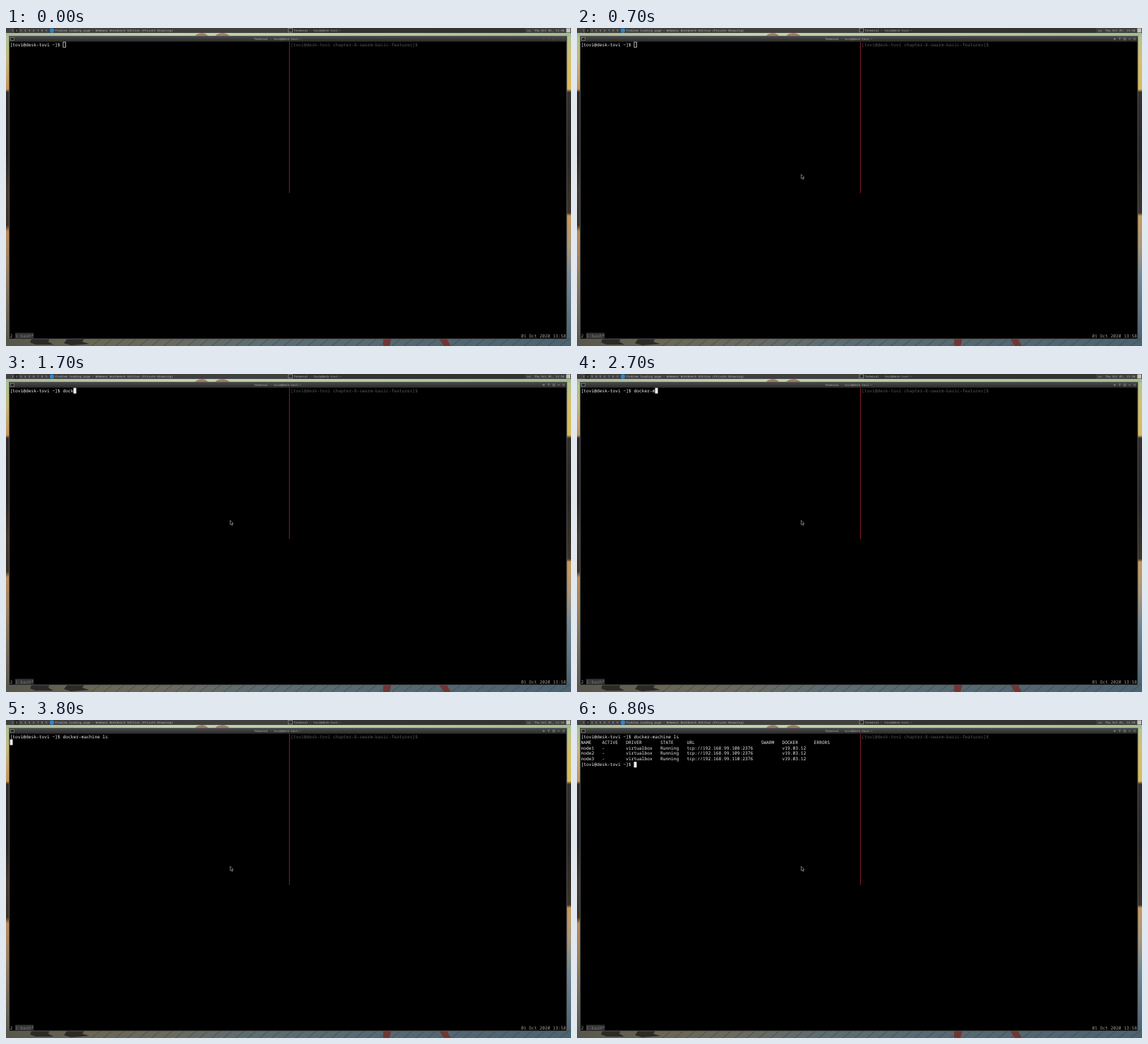
Recreate the animation shown at these times as an HTML page. Size 800x450 px, loop 8 s.

```html
<!DOCTYPE html>
<html lang="en">
<head>
<meta charset="utf-8">
<title>Terminal</title>
<style>
  html, body { margin: 0; width: 100%; height: 100%; overflow: hidden; background: #000; }
  svg { display: block; width: 100vw; height: 100vh; }
  text {
    font-family: "Noto Sans Mono", "DejaVu Sans Mono", monospace;
    white-space: pre;
    text-rendering: geometricPrecision;
  }
  .term text { font-size: 6.25px; fill: #f0f0f0; }
  .small text { font-size: 4.18px; fill: #b4b4b4; }
</style>
</head>
<body>
<svg id="stage" viewBox="0 0 800 450" preserveAspectRatio="none">
  <defs>
    <linearGradient id="sky">
      <stop offset="0" stop-color="#a9b795"/>
      <stop offset=".3" stop-color="#c3d2ae"/>
      <stop offset=".7" stop-color="#b4ca9e"/>
      <stop offset="1" stop-color="#a2bd90"/>
    </linearGradient>
    <linearGradient id="leftEdge" x1="0" y1="0" x2="0" y2="1">
      <stop offset="0" stop-color="#a9c193"/>
      <stop offset=".07" stop-color="#c3b67c"/>
      <stop offset=".17" stop-color="#c4935a"/>
      <stop offset=".18" stop-color="#2f2b28"/>
      <stop offset=".38" stop-color="#292725"/>
      <stop offset=".5" stop-color="#46382c"/>
      <stop offset=".61" stop-color="#3c3128"/>
      <stop offset=".63" stop-color="#b98a58"/>
      <stop offset=".74" stop-color="#9a8062"/>
      <stop offset=".87" stop-color="#74695a"/>
      <stop offset="1" stop-color="#56544a"/>
    </linearGradient>
    <linearGradient id="rightEdge" x1="0" y1="0" x2="0" y2="1">
      <stop offset="0" stop-color="#b4c490"/>
      <stop offset=".07" stop-color="#d3c06c"/>
      <stop offset=".17" stop-color="#d8ba5c"/>
      <stop offset=".18" stop-color="#33302e"/>
      <stop offset=".38" stop-color="#292725"/>
      <stop offset=".57" stop-color="#3c342c"/>
      <stop offset=".58" stop-color="#c79a5c"/>
      <stop offset=".68" stop-color="#a8987c"/>
      <stop offset=".78" stop-color="#748894"/>
      <stop offset="1" stop-color="#466072"/>
    </linearGradient>
    <linearGradient id="ground">
      <stop offset="0" stop-color="#57564b"/>
      <stop offset=".16" stop-color="#6b6754"/>
      <stop offset=".3" stop-color="#6a6a60"/>
      <stop offset=".45" stop-color="#5d6d72"/>
      <stop offset="1" stop-color="#4c6371"/>
    </linearGradient>
    <linearGradient id="titleBar" x1="0" y1="0" x2="0" y2="1">
      <stop offset="0" stop-color="#484848"/>
      <stop offset="1" stop-color="#2b2b2b"/>
    </linearGradient>
  </defs>

  <g id="wallpaper">
    <rect width="800" height="13" fill="url(#sky)"/>
    <path d="M266 13Q270 7 278 7Q285 8 287 13ZM295 13Q298 7 307 7Q315 8 318 13Z" fill="#a07e68"/>
    <rect y="12" width="6" height="438" fill="url(#leftEdge)"/>
    <rect x="793" y="12" width="7" height="438" fill="url(#rightEdge)"/>
    <rect y="438" width="800" height="12" fill="url(#ground)"/>
    <g id="planks" stroke="#3a474b" stroke-width=".8"/>
    <path d="M37 438H62L60 444L67 448H42L34 445ZM88 438H112L108 444L118 447L92 449L82 446Z" fill="#2b2a26"/>
    <path d="M534 438H546L543 450H534ZM612 438H623L630 450H620Z" fill="#713632"/>
  </g>

  <g class="small">
    <rect width="800" height="7" fill="#404040"/>
    <rect x="398" width="337" height="7" fill="#333"/>
    <rect x="12" width="6" height="7" fill="#262626"/>
    <g id="tags"></g>
    <circle cx="65" cy="3.6" r="3.1" fill="#2b86d0"/>
    <text x="69.5" y="5">Problem loading page - Webmoor Workbench Edition (Private Browsing)</text>
    <rect x="399.5" y=".8" width="6" height="5" fill="#222" stroke="#aaa" stroke-width=".7"/>
    <path d="M401 2.2l1.2 1l-1.2 1" fill="none" stroke="#ccc" stroke-width=".5"/>
    <text x="407.5" y="5">Terminal - tovi@desk-tovi:~</text>
    <text x="738" y="5">us</text>
    <text x="748" y="5">Thu Oct 01, 13:58</text>
    <rect x="793.3" y=".4" width="5.8" height="6" fill="#c4c4be"/>

    <rect x="4.5" y="11.5" width="789.5" height="428.5" fill="#000" stroke="#5c5c5c" stroke-width=".9"/>
    <rect x="5" y="12" width="788.5" height="7.4" fill="url(#titleBar)"/>
    <rect x="6.5" y="13.4" width="5" height="4.4" fill="#222" stroke="#999" stroke-width=".6"/>
    <text x="351" y="17.2">Terminal - tovi@desk-tovi:~</text>
    <path id="buttons" fill="none" stroke-width=".6"
      d="M759.5 15.5h3.6M761.3 13.7v3.6M766.8 14.2h3.2M768.4 14.2v3M774.3 14.2h2.6v2.6h-2.6zM780.8 15.6h3.4M788 14l3 3M791 14l-3 3"/>
  </g>

  <g class="term" id="term">
    <rect x="400.8" y="19.5" width="1.1" height="214" fill="#841a2c"/>
    <rect x="13" y="431.4" width="26.25" height="8" fill="#343434"/>
    <g id="fixed"></g>
    <g id="live"></g>
    <rect id="caret"/>
  </g>

  <path id="pointer" d="M317.4 207v6.2l1.4-1.2l1.1 2.3l1.1-.5l-1-2.2h1.9z" fill="#000" stroke="#ccc" stroke-width=".55"/>
</svg>
<script>
const LOOP = 8000, CELL = 3.75, ROW = 7.92, LEFT = 5.5, TOP = 19.6;
const NS = "http://www.w3.org/2000/svg";
const $ = id => document.getElementById(id);

function setAttrs(el, attrs) {
  for (const key in attrs) el.setAttribute(key, attrs[key]);
}
function add(parent, tag, attrs, content = "") {
  const el = document.createElementNS(NS, tag);
  setAttrs(el, attrs);
  el.textContent = content;
  return parent.appendChild(el);
}
const colX = col => LEFT + col * CELL;
const rowY = row => TOP + row * ROW;
const put = (parent, col, row, content, color = "#f0f0f0") =>
  add(parent, "text", { x: colX(col), y: rowY(row) + 6.1, style: "fill:" + color }, content);

for (let i = 1; i <= 9; i++)
  add($("tags"), "text", { x: 2 + i * 6, y: 5 }, i);
for (let x = 135; x < 820; x += 17)
  add($("planks"), "path", { d: `M${x} 439l-14 11` });

const prompt = "[tovi@desk-tovi ~]$ ";
put($("fixed"), 106, 0, "[tovi@desk-tovi chapter-8-swarm-basic-features]$", "#565656");
put($("fixed"), 0, 52, "2", "#a0a0a0");
put($("fixed"), 2, 52, "1:bash*", "#7c7c7c");
put($("fixed"), 193, 52, "01 Oct 2020 13:58", "#a0a0a0");

const command = put($("live"), 0, 0, prompt);
const output = add($("live"), "g", {});
const columns = [0, 8, 17, 30, 40, 68, 76, 88];
const table = [
  ["NAME", "ACTIVE", "DRIVER", "STATE", "URL", "SWARM", "DOCKER", "ERRORS"],
  ...[1, 2, 3].map(n => ["node" + n, "-", "virtualbox", "Running",
    `tcp://192.168.99.${107 + n}:2376`, "", "v19.03.12", ""])
];
table.forEach((cells, r) => cells.forEach((s, c) => s && put(output, columns[c], r + 1, s)));
put(output, 0, 5, prompt);

// [time, characters typed]; the jump to 15 is a tab completion
const line = "docker-machine ls";
const keys = [[0, 0], [1400, 1], [1600, 3], [1700, 4], [1900, 5], [2000, 6], [2300, 7],
  [2700, 8], [2800, 9], [3000, 10], [3300, 15], [3500, 16], [3600, 17]];
const ENTER = 3700, RESULT = 6600, FOCUS = 1400, POINTER = 100;

function setCaret(col, row, solid) {
  const inset = solid ? 0 : 0.4;
  setAttrs($("caret"), {
    x: colX(col) + inset, y: rowY(row) + inset,
    width: (solid ? 4 : 4.4) - 2 * inset, height: 8 - 2 * inset,
    fill: solid ? "#f0f0f0" : "none",
    stroke: solid ? "none" : "#e0e0e0", "stroke-width": 0.8
  });
}

function draw(t) {
  const typed = keys.filter(k => k[0] <= t).pop()[1];
  command.textContent = prompt + line.slice(0, typed);
  const done = t >= RESULT;
  output.style.display = done ? "" : "none";
  if (done) setCaret(20, 5, true);
  else if (t >= ENTER) setCaret(0, 1, true);
  else setCaret(20 + typed, 0, t >= FOCUS);
  $("pointer").style.display = t >= POINTER ? "" : "none";
  $("buttons").setAttribute("stroke", t >= POINTER ? "#a0a0a0" : "#6b4648");
}

let start;
function tick(now) {
  start ??= now;
  draw((now - start) % LOOP);
  requestAnimationFrame(tick);
}
draw(0);
requestAnimationFrame(tick);
</script>
</body>
</html>
```
